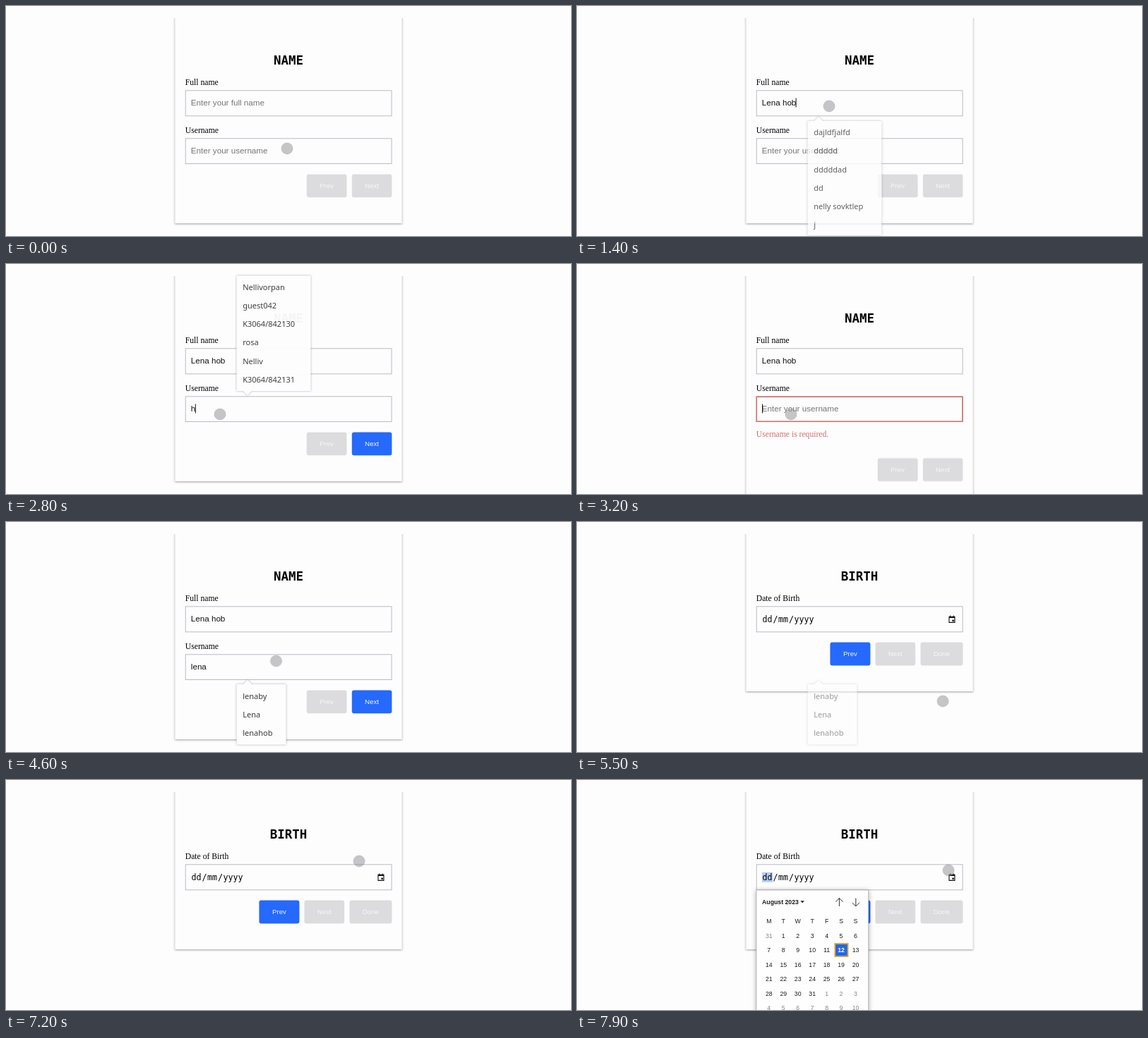
An HTML page that plays this animation: 800x326 px, repeating every 8 s.

```html
<!DOCTYPE html>
<html lang="en">
<head>
<meta charset="utf-8">
<title>Step form</title>
<style>
html, body { margin: 0; width: 100%; height: 100%; overflow: hidden; background: #fefdfe; }
svg { display: block; width: 800px; height: 326px; }
text { white-space: pre; }

.label { font: 11.65px "Liberation Serif", serif; }
.input { font: 11.65px "Liberation Sans", sans-serif; fill: #111; }
.hint { fill: #757575; }
.title { font: bold 17.45px "DejaVu Sans Mono", monospace; text-anchor: middle; }
.date { font: 11.65px "DejaVu Sans Mono", monospace; }
.btn { font: 9.7px "Liberation Sans", sans-serif; text-anchor: middle; fill: #f7f6f8; }
.btn rect { fill: #dcdbdd; }
.btn .blue { fill: #2569fd; }
.field { fill: none; stroke: #b9b8c4; }
.card { fill: #fefdfe; filter: drop-shadow(0 1.5px 1.5px rgba(0, 0, 0, .38)); }
.popup { font: 11px "Noto Sans", sans-serif; fill: #3a3a3c; }
.popup path { fill: #fefdfe; filter: drop-shadow(0 .5px 1.5px rgba(0, 0, 0, .32)); }
.cal { font: 8.73px "Liberation Sans", sans-serif; fill: #1c1c1e; text-anchor: middle; }
.cal .panel { fill: #fefefe; stroke: #aaa; stroke-width: .7; filter: drop-shadow(0 1px 3px rgba(0, 0, 0, .35)); }
.cal .dim { fill: #85858a; }
.cal .today { fill: #fff; font-weight: bold; }
.caret { fill: #111; }

/* Everything runs on one 8 s clock in 100 ms steps: 1.25% each */
.a { animation: 8s step-end -20ms infinite; }
.off { opacity: 0; }
#card { animation-name: card; }
#namePage { animation-name: namePage; }
#birthPage { animation-name: birthPage; }
#nameHint { animation-name: nameHint; }
#nameText { animation-name: nameText; }
#nameCaret { animation-name: nameCaret; }
#userHint { animation-name: userHint; }
#typo { animation-name: typo; }
#key1 { animation-name: key1; }
#key2 { animation-name: key2; }
#key3 { animation-name: key3; }
#userCaret { animation-name: userCaret; }
#error { animation-name: error; }
#nav { animation-name: nav; }
#nextOn { animation-name: nextOn; }
#namePopup { animation-name: namePopup; }
#userPopup { animation-name: userPopup; }
#matchPopup { animation-name: matchPopup; }
#calendar, #selected { animation-name: calendar; }
#cursor { animation-name: cursor; }

@keyframes card {
  0% { transform: none }
  40% { transform: translateY(37px) }
  43.75% { transform: none }
  68.75% { transform: translateY(-68px) }
}
@keyframes namePage { 68.75% { opacity: 0 } }
@keyframes birthPage { 68.75% { opacity: 1 } }
@keyframes nameHint { 17.5% { opacity: 0 } }
@keyframes nameText { 17.5% { opacity: 1 } }
@keyframes nameCaret {
  12.5% { opacity: 1; transform: none }
  17.5% { opacity: 1; transform: translateX(47.6px) }
  22.5% { opacity: 0 }
}
@keyframes userHint { 35% { opacity: 0 } 40% { opacity: 1 } 43.75% { opacity: 0 } }
@keyframes typo { 35% { opacity: 1 } 40% { opacity: 0 } }
@keyframes key1 { 43.75% { opacity: 1 } }
@keyframes key2 { 47.5% { opacity: 1 } }
@keyframes key3 { 51.25% { opacity: 1 } }
@keyframes userCaret {
  28.75% { opacity: 1; transform: none }
  35% { opacity: 1; transform: translateX(5.8px) }
  40% { opacity: 1; transform: none }
  43.75% { opacity: 1; transform: translateX(2.6px) }
  47.5% { opacity: 1; transform: translateX(9px) }
  51.25% { opacity: 1; transform: translateX(22px) }
  57.5% { opacity: 0 }
  62.5% { opacity: 1; transform: translateX(22px) }
  68.75% { opacity: 0 }
}
@keyframes error { 40% { opacity: 1 } 43.75% { opacity: 0 } }
@keyframes nav { 0% { transform: none } 40% { transform: translateY(36.7px) } 43.75% { transform: none } }
@keyframes nextOn { 35% { opacity: 1 } 40% { opacity: 0 } 43.75% { opacity: 1 } }
@keyframes namePopup {
  12.5% { opacity: .6 } 13.75% { opacity: 1 }
  17.5% { opacity: .8 } 18.75% { opacity: .35 } 20% { opacity: 0 }
}
@keyframes userPopup { 28.75% { opacity: 1 } 35% { opacity: .97 } 36.25% { opacity: .45 } 37.5% { opacity: 0 } }
@keyframes matchPopup { 45% { opacity: .5 } 46.25% { opacity: 1 } 68.75% { opacity: .5 } 70% { opacity: 0 } }
@keyframes calendar { 98.75% { opacity: 1 } }
@keyframes cursor {
  0% { transform: translate(398px, 202px) }
  1.25% { transform: translate(400px, 190px) }
  3.75% { transform: translate(390px, 176px) }
  5% { transform: translate(366px, 152px) }
  6.25% { transform: translate(357px, 142px) }
  22.5% { transform: translate(334px, 176px) }
  23.75% { transform: translate(303px, 213px) }
  57.5% { transform: translate(382.5px, 197px) }
  58.75% { transform: translate(424px, 206px) }
  60% { transform: translate(453px, 212px) }
  62.5% { transform: translate(490px, 236px) }
  63.75% { transform: translate(518px, 254px) }
  71.25% { transform: translate(505px, 250px) }
  72.5% { transform: translate(485px, 242px) }
  73.75% { transform: translate(465px, 233px) }
  75% { transform: translate(455px, 227px) }
  78.75% { transform: translate(446.5px, 222.5px) }
  80% { transform: translate(432px, 205px) }
  81.25% { transform: translate(418px, 182px) }
  82.5% { transform: translate(406px, 158px) }
  83.75% { transform: translate(399px, 143px) }
  86.25% { transform: translate(415px, 124px) }
  87.5% { transform: translate(440px, 109px) }
  88.75% { transform: translate(470px, 107px) }
  90% { transform: translate(500px, 115px) }
  91.25% { transform: translate(526px, 128px) }
}
</style>
</head>
<body>
<svg viewBox="0 0 800 326">
  <clipPath id="below"><rect y="17.5" width="800" height="309"/></clipPath>
  <g clip-path="url(#below)">
    <rect id="card" class="a card" x="239.3" y="-100" width="321.4" height="408"/>
  </g>

  <g id="namePage" class="a">
    <text class="title" x="400" y="83.4">NAME</text>
    <text class="label" x="253.8" y="112">Full name</text>
    <rect class="field" x="254.2" y="119.8" width="291.8" height="36"/>
    <text id="nameHint" class="a input hint" x="261.8" y="140.8">Enter your full name</text>
    <text id="nameText" class="a input off" x="261.8" y="140.8">Lena hob</text>
    <rect id="nameCaret" class="a caret off" x="262" y="130.5" width="1" height="13"/>

    <text class="label" x="253.8" y="180">Username</text>
    <rect class="field" x="254.2" y="187.8" width="291.8" height="35.7"/>
    <g id="error" class="a off">
      <rect x="254.3" y="188.2" width="291.5" height="35" fill="none" stroke="#d0746a" stroke-width="1.6"/>
      <text class="label" x="253.8" y="245" fill="#cf6f68">Username is required.</text>
    </g>
    <text id="userHint" class="a input hint" x="261.8" y="208.8">Enter your username</text>
    <text id="typo" class="a input off" x="261.8" y="208.8">h</text>
    <g class="input">
      <text id="key1" class="a off" x="261.8" y="208.8">l</text>
      <text id="key2" class="a off" x="264.4" y="208.8">e</text>
      <text id="key3" class="a off" x="270.9" y="208.8">na</text>
    </g>
    <rect id="userCaret" class="a caret off" x="262" y="198.5" width="1" height="13"/>

    <g id="nav" class="a btn">
      <rect x="425.7" y="238.5" width="56.8" height="32.8" rx="3"/>
      <text x="454" y="258.3">Prev</text>
      <rect x="489.8" y="238.5" width="56.5" height="32.8" rx="3"/>
      <rect id="nextOn" class="a blue off" x="489.8" y="238.5" width="56.5" height="32.8" rx="3"/>
      <text x="518" y="258.3">Next</text>
    </g>
  </g>

  <g id="birthPage" class="a off">
    <text class="title" x="400" y="83.4">BIRTH</text>
    <text class="label" x="253.8" y="112">Date of Birth</text>
    <rect class="field" x="254.2" y="119.8" width="291.8" height="36"/>
    <rect id="selected" class="a off" x="262" y="130.8" width="15" height="14" fill="#b3cdf6"/>
    <text class="date" y="141.8"><tspan x="262.6">dd</tspan><tspan x="277.4">/</tspan><tspan x="285.1">mm</tspan><tspan x="299.9">/</tspan><tspan x="307.6">yyyy</tspan></text>
    <path d="M526.9 134.4h8v8h-8zM528.6 132.6v2M533.2 132.6v2M526.9 135.4h8" fill="none" stroke="#111" stroke-width="1.1"/>
    <rect x="531.4" y="138.6" width="2.3" height="2.3"/>
    <g class="btn">
      <rect class="blue" x="358.4" y="170.6" width="57" height="32.8" rx="3"/>
      <text x="387" y="190.4">Prev</text>
      <rect x="422.4" y="170.6" width="56.7" height="32.8" rx="3"/>
      <text x="450.8" y="190.4">Next</text>
      <rect x="486.4" y="170.6" width="60" height="32.8" rx="3"/>
      <text x="516.3" y="190.4">Done</text>
    </g>
  </g>

  <g id="namePopup" class="a popup off">
    <path d="M326.5 163h9.5l6-6 6 6h83.5v162h-105z"/>
  </g>
  <g id="userPopup" class="a popup off">
    <path d="M326.5 16.5h105v163.5h-83.5l-6 6-6-6h-9.5z"/>
  </g>
  <g id="matchPopup" class="a popup off">
    <path d="M326.5 230h9.5l6-6 6 6h48.5v85.5h-70z"/>
  </g>

  <g id="calendar" class="a cal off">
    <rect class="panel" x="254" y="156" width="158.7" height="190"/>
    <text x="288" y="175.8" font-weight="bold">August 2023</text>
    <path d="M316.4 171.2h5.6l-2.8 3z"/>
    <path d="M371.4 179v-11.5M366.2 172.7l5.2-5.2 5.2 5.2M394.8 167.5v11.5M389.6 173.8l5.2 5.2 5.2-5.2" fill="none" stroke="#333"/>
    <rect x="365.3" y="232" width="18.2" height="18" fill="#2367e8" stroke="#dfa535" stroke-width="1.8"/>
  </g>

  <circle id="cursor" class="a" r="8.3" fill="#8c8b90" fill-opacity=".5" stroke="#8c8b90" stroke-opacity=".12"/>
</svg>
<script>
const byId = id => document.getElementById(id);

function addText(parent, x, y, content, cls = '') {
  const el = document.createElementNS('http://www.w3.org/2000/svg', 'text');
  el.setAttribute('x', x);
  el.setAttribute('y', y);
  el.setAttribute('class', cls);
  el.textContent = content;
  parent.append(el);
}

function fillPopup(id, y, items) {
  items.forEach((item, i) => addText(byId(id), 335.2, y + i * 26.15, item));
}

fillPopup('namePopup', 183.2, ['dajldfjalfd', 'ddddd', 'dddddad', 'dd', 'nelly sovktlep', 'j']);
fillPopup('userPopup', 37, ['Nellivorpan', 'guest042', 'K3064/842130', 'rosa', 'Nelliv', 'K3064/842131']);
fillPopup('matchPopup', 251, ['lenaby', 'Lena', 'lenahob']);

const cal = byId('calendar');
const colX = i => 271.8 + 20.45 * i;
[...'MTWTFSS'].forEach((day, i) => addText(cal, colX(i), 203, day));
for (let i = 0; i < 42; i++) {
  const day = new Date(2023, 6, 31 + i);
  const date = day.getDate();
  const inMonth = day.getMonth() === 7;
  const cls = !inMonth ? 'dim' : date === 12 ? 'today' : '';
  addText(cal, colX(i % 7), 223.7 + 20.5 * Math.floor(i / 7), date, cls);
}
</script>
</body>
</html>
```
